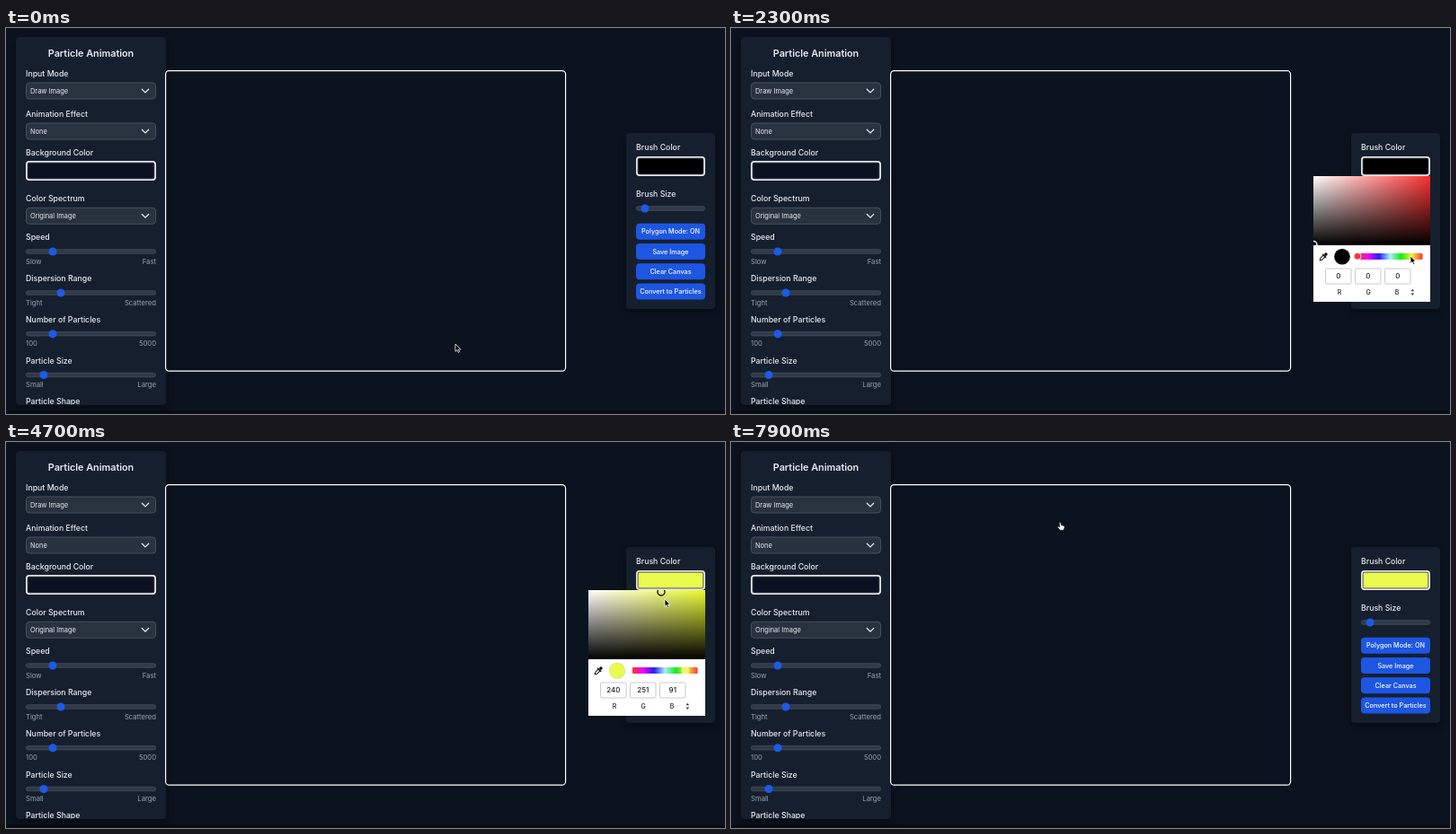
Write an HTML page that moves like this. It is 800 by 430 pixels and loops after 8 s.

```html
<!DOCTYPE html>
<html lang="en">
<head>
<meta charset="utf-8">
<title>Particle Animation</title>
<style>
  html, body { margin: 0; width: 100%; height: 100%; overflow: hidden; background: #0b131f; }
  svg { display: block; width: 800px; height: 430px; }
  text { font-family: Inter, "Open Sans", sans-serif; fill: #e8ebf0; }
  .title { font-size: 10.8px; font-weight: 600; }
  .label { font-size: 8.75px; font-weight: 500; }
  .option { font-size: 7.45px; }
  .hint { font-size: 7.7px; fill: #9ca3af; }
  .button { font-size: 7.25px; font-weight: 500; fill: #fff; }
  .value { font-size: 8px; font-weight: 500; fill: #222; }
  .channel { font-size: 7px; font-weight: 500; fill: #222; }
  .panel { fill: #161f2e; filter: drop-shadow(0 3px 5px #0006); }
</style>
</head>
<body>
<svg viewBox="0 0 800 430">
  <defs>
    <linearGradient id="white"><stop stop-color="#fff"/><stop offset="1" stop-color="#fff" stop-opacity="0"/></linearGradient>
    <linearGradient id="black" x2="0" y2="1"><stop stop-color="#000" stop-opacity="0"/><stop offset="1"/></linearGradient>
    <linearGradient id="hues"></linearGradient>
    <clipPath id="panelClip"><rect x="11" y="10" width="167" height="409.5"/></clipPath>
    <clipPath id="fieldClip"><rect x="648" y="165" width="130" height="77"/></clipPath>
  </defs>
  <rect width="800" height="430" fill="#0b131f"/>
  <rect y="426" width="800" height="4" fill="#070c15"/>
  <g id="controls"></g>
  <g id="picker">
    <rect x="648" y="165" width="130" height="140" fill="#fff"/>
    <g clip-path="url(#fieldClip)">
      <rect id="field" x="648" y="165" width="130" height="77"/>
      <rect x="648" y="165" width="130" height="77" fill="url(#white)"/>
      <rect x="648" y="165" width="130" height="77" fill="url(#black)"/>
      <circle id="shade" r="4" fill="none" stroke-width="1.4"/>
    </g>
    <g transform="translate(659.5 254.5) rotate(45)">
      <path d="M-1.3 -1V4L0 6L1.3 4V-1Z" fill="#fff" stroke="#111" stroke-width="1"/>
      <path d="M-2.8 -1.6H2.8V-.2H-2.8ZM-1.6 -2V-4.4Q0 -6.2 1.6 -4.4V-2Z" fill="#111"/>
    </g>
    <circle id="preview" cx="680" cy="254.7" r="8.8" stroke="#0003" stroke-width=".5"/>
    <rect x="697" y="251" width="72.5" height="7" rx="1" fill="url(#hues)"/>
    <circle id="hue" cy="254.3"/>
    <g id="fields"></g>
    <path d="M756.4 293.2l1.9-2.4 1.9 2.4ZM756.4 295.5l1.9 2.4 1.9-2.4Z" fill="#444"/>
  </g>
  <path id="arrow" d="M0 0V8.3L1.9 6.6L3.2 9.4L4.6 8.7L3.4 6.1H5.9Z" fill="#000" stroke="#fff" stroke-width=".8"/>
  <path id="hand" d="M-1.8 -3.8Q-1 -5 -.1 -3.8L.5 -1.2L3.2 -.6Q4.2 0 4 1.6L3 4.4H-.8L-3.6 1.2Q-3.6 0 -2.4 .3L-1.2 1Z" fill="#fff" stroke="#111" stroke-width=".6"/>
</svg>
<script>
const $ = id => document.getElementById(id);
const set = (id, attrs) => { for (const k in attrs) $(id).setAttribute(k, attrs[k]); };

const text = (x, y, cls, str, anchor = 'start') =>
  `<text x="${x}" y="${y}" dy=".36em" class="${cls}" text-anchor="${anchor}">${str}</text>`;
const rect = (x, y, w, h, rx, attrs) =>
  `<rect x="${x}" y="${y}" width="${w}" height="${h}" rx="${rx}" ${attrs}/>`;
const select = (y, label, option) => text(22, y - 19.3, 'label', label) +
  rect(22.5, y - 9, 144, 18, 3.5, 'fill="#29323f" stroke="#4b5563" stroke-width=".9"') +
  text(27, y, 'option', option) +
  `<path d="M151.3 ${y - 1.8}l3.7 3.7 3.7-3.7" fill="none" stroke="#e5e7eb" stroke-width="1.3" stroke-linecap="round"/>`;
const slider = (x, y, w, thumb) =>
  rect(x + .4, y - 2.2, w - .8, 4.4, 2.2, 'fill="#303947" stroke="#4b5563" stroke-width=".7"') +
  `<circle cx="${thumb}" cy="${y}" r="4.5" fill="#1d5ae8"/>`;
const range = (y, label, low, high, thumb) => text(22, y - 16, 'label', label) +
  slider(22, y, 145, thumb) + text(22, y + 11, 'hint', low) + text(167, y + 11, 'hint', high, 'end');
const swatch = (x, y, w, id, fill) =>
  rect(x + .9, y + .9, w - 1.8, 20.2, 3, 'fill="#161f2e" stroke="#e8e8ea" stroke-width="1.8"') +
  rect(x + 2.3, y + 2.3, w - 4.6, 17.4, 1.5, `id="${id}" fill="${fill}" stroke="#555" stroke-width=".5"`);
const button = (y, str) => rect(701, y, 77, 18, 4, 'fill="#1d56e2"') + text(739.5, y + 9, 'button', str, 'middle');

$('controls').innerHTML =
  rect(11, 10, 167, 410, 4, 'class="panel"') +
  rect(177.6, 47.6, 445, 334.6, 4, 'fill="none" stroke="#fff" stroke-width="1.2"') +
  '<g clip-path="url(#panelClip)">' +
  text(94.5, 28, 'title', 'Particle Animation', 'middle') +
  select(70, 'Input Mode', 'Draw Image') +
  select(115, 'Animation Effect', 'None') +
  text(22, 138.5, 'label', 'Background Color') + swatch(22, 148, 145, 'background', '#0b1120') +
  select(209.3, 'Color Spectrum', 'Original Image') +
  range(249, 'Speed', 'Slow', 'Fast', 52) +
  range(295, 'Dispersion Range', 'Tight', 'Scattered', 61) +
  range(340.7, 'Number of Particles', '100', '5000', 52) +
  range(386.5, 'Particle Size', 'Small', 'Large', 42) +
  text(22, 416.3, 'label', 'Particle Shape') + '</g>' +
  rect(690, 117, 99, 196, 4, 'class="panel"') +
  text(701, 133.3, 'label', 'Brush Color') + swatch(701, 143, 77, 'brush', '#000') +
  text(701, 185, 'label', 'Brush Size') + slider(701, 201, 77, 711) +
  ['Polygon Mode: ON', 'Save Image', 'Clear Canvas', 'Convert to Particles']
    .map((str, i) => button(217.8 + i * 22.2, str)).join('');

$('hues').innerHTML = ['#f33', '#e0f', '#22e', '#aef', '#1e1', '#fe3', '#f33']
  .map((c, i) => `<stop offset="${i / 6}" stop-color="${c}"/>`).join('');

$('fields').innerHTML = ['R', 'G', 'B'].map((c, i) => {
  const x = 661.5 + i * 33;
  return rect(x, 268, 28.5, 17, 1.5, 'fill="#fff" stroke="#bbb" stroke-width=".8"') +
    `<text id="value${i}" x="${x + 14.3}" y="276.3" dy=".36em" class="value" text-anchor="middle"></text>` +
    text(677 + i * 32, 294.3, 'channel', c, 'middle');
}).join('');

const LOOP = 8000, OPEN = 900, HUE = 2400, PICK = 4200, CLOSE = 6700;
const YELLOW = '#ebfa4e';

// Pointer path: time, x, y
const path = [
  [0, 500, 352], [600, 738, 154], [900, 738, 154], [1700, 731, 257], [2300, 756, 254],
  [3100, 756, 254], [3900, 728, 167], [4300, 728, 167], [4700, 733, 175], [5200, 733, 175],
  [6200, 350, 86], [6800, 350, 86], [7900, 367, 90], [8000, 367, 90]
];
function pointerAt(t) {
  const i = path.findIndex(p => p[0] > t);
  const [t0, x0, y0] = path[i - 1], [t1, x1, y1] = path[i];
  const u = (t - t0) / (t1 - t0), e = u * u * (3 - 2 * u);
  return [x0 + (x1 - x0) * e, y0 + (y1 - y0) * e];
}

function draw(t) {
  const picked = t >= PICK, hued = t >= HUE;
  const color = picked ? YELLOW : '#000';
  set('brush', { fill: color });
  set('preview', { fill: color });
  set('picker', { visibility: t >= OPEN && t < CLOSE ? 'visible' : 'hidden' });
  set('field', { fill: hued ? '#e9f92f' : '#fb3030' });
  set('shade', picked ? { cx: 729, cy: 167, stroke: '#111' } : { cx: 648, cy: 241.5, stroke: '#fff' });
  set('hue', {
    cx: hued ? 755.8 : 697, r: hued && !picked ? 5 : 4,
    fill: hued ? '#f8f660' : '#f33',
    stroke: hued ? (picked ? '#fff3c4' : '#111') : '#fff',
    'stroke-width': hued && !picked ? 1.5 : 1
  });
  [240, 251, 91].forEach((v, i) => $('value' + i).textContent = picked ? v : 0);

  const [x, y] = pointerAt(t), pointing = t > PICK && x < 648;
  set('arrow', { transform: `translate(${x} ${y})`, visibility: pointing ? 'hidden' : 'visible' });
  set('hand', { transform: `translate(${x} ${y + 3.8})`, visibility: pointing ? 'visible' : 'hidden' });
}

function frame() {
  draw(Math.floor(performance.now() % LOOP / 100) * 100);
  requestAnimationFrame(frame);
}
frame();
</script>
</body>
</html>
```
